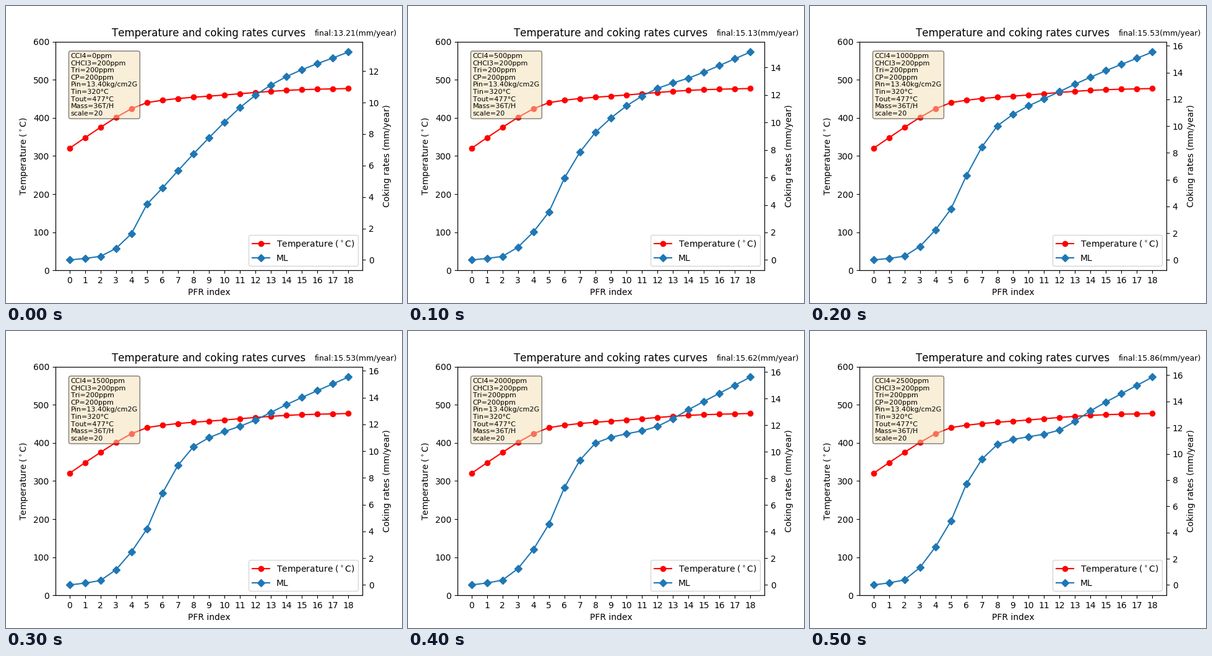
A matplotlib script for the animation above (600 ms loop, 640x480 px).

```python
import matplotlib.pyplot as plt
import numpy as np
from matplotlib.animation import FuncAnimation

plt.rcParams["text.kerning_factor"] = 6

INDEX = np.arange(19)
DOSE_STEP = 500

# Key points of each coking curve, one row per CCl4 dose
RATE_KEYS = [0, 2, 4, 5, 6, 8, 12, 14, 18]
RATE_CURVES = [
    [0, .23, 1.67, 3.54, 4.57, 6.74, 10.47, 11.65, 13.21],
    [0, .26, 2.04, 3.49, 5.96, 9.29, 12.49, 13.23, 15.13],
    [0, .28, 2.24, 3.81, 6.30, 10.02, 12.57, 13.65, 15.53],
    [0, .33, 2.47, 4.18, 6.86, 10.33, 12.31, 13.47, 15.53],
    [0, .36, 2.67, 4.57, 7.32, 10.66, 11.91, 13.17, 15.62],
    [0, .38, 2.90, 4.88, 7.71, 10.72, 11.81, 13.28, 15.86],
]
SETTINGS = ["CHCl3=200ppm", "Tri=200ppm", "CP=200ppm", "Pin=13.40kg/cm2G",
            "Tin=320°C", "Tout=477°C", "Mass=36T/H", "scale=20"]
TEMPERATURE_LABEL = r"Temperature ($^\circ$C)"


def smooth_rise(x, keys, values):
    """Cubic through rising key points that never overshoots."""
    step = np.diff(keys)
    secant = np.diff(values) / step
    before, after = step[:-1], step[1:]
    w0, w1 = 2 * after + before, after + 2 * before
    inner = (w0 + w1) / (w0 / secant[:-1] + w1 / secant[1:])
    slope = np.concatenate([secant[:1], inner, secant[-1:]])

    i = np.clip(np.searchsorted(keys, x, side="right") - 1, 0, len(step) - 1)
    t = (x - np.take(keys, i)) / step[i]
    ease = t * t * (3 - 2 * t)
    bend = t * (1 - t) * ((1 - t) * (slope[i] - secant[i])
                          - t * (slope[i + 1] - secant[i]))
    # The chord's own cubic is t, so only its excess over the ease is added
    chord = t - ease
    start, rise = np.take(values, i), step[i] * secant[i]
    return start + rise * (ease + chord) + step[i] * bend


fig, ax = plt.subplots(figsize=(6.4, 4.8), dpi=100)
rate_ax = ax.twinx()

temperatures = smooth_rise(INDEX, [0, 2, 4, 5, 10, 15, 18],
                           [320, 375, 424, 440, 460, 474, 477])
temp_line, = ax.plot(INDEX, temperatures, "ro-", label=TEMPERATURE_LABEL)
rate_line, = rate_ax.plot(INDEX, 0 * INDEX, "D-", color="tab:blue", label="ML")

ax.set_title("Temperature and coking rates curves")
ax.set_xlabel("PFR index")
ax.set_ylabel(TEMPERATURE_LABEL)
ax.set_xticks(INDEX)
ax.set_ylim(0, 600)
rate_ax.set_ylabel("Coking rates (mm/year)")
rate_ax.legend(handles=[temp_line, rate_line], loc="lower right")

settings_box = ax.text(
    0.05, 0.95, "", transform=ax.transAxes, fontsize=8, va="top",
    bbox=dict(boxstyle="round", facecolor="wheat", alpha=0.5))
final_text = fig.text(0.78, 0.9, "", fontsize=9)


def update(frame):
    curve = RATE_CURVES[frame]
    final = curve[-1]
    rate_line.set_ydata(smooth_rise(INDEX, RATE_KEYS, curve))
    rate_ax.set_ylim(-0.05 * final, 1.05 * final)
    settings_box.set_text(
        "\n".join([f"CCl4={frame * DOSE_STEP}ppm", *SETTINGS]))
    final_text.set_text(f"final:{final:.2f}(mm/year)")
    return rate_line, settings_box, final_text


animation = FuncAnimation(fig, update, frames=len(RATE_CURVES), interval=100,
                          repeat=True, repeat_delay=0)
plt.show()
```
